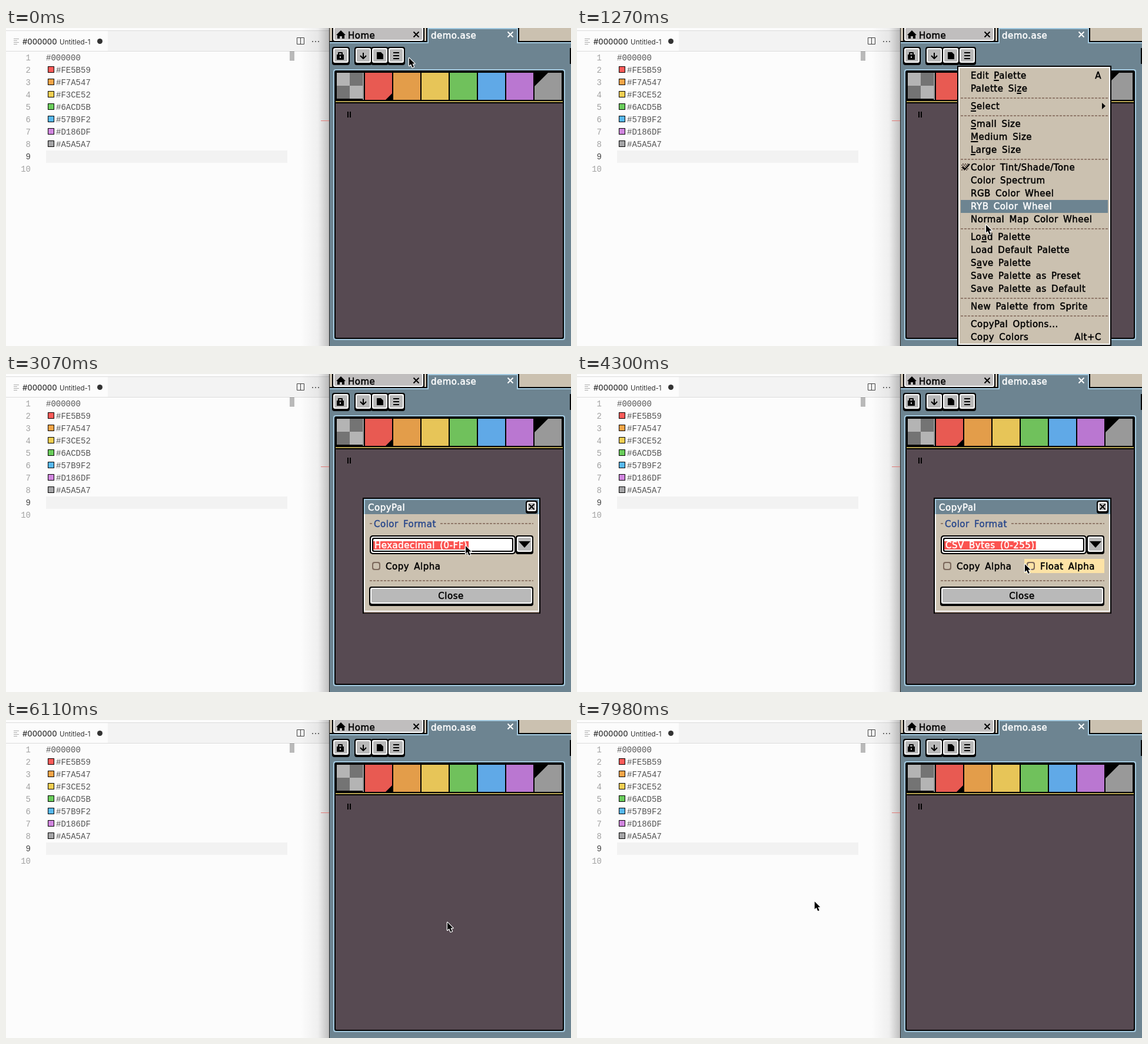
Recreate the animation shown at these times as an HTML page with a canvas. Size 960 by 540 pixels, loop 8000 ms.

```html
<!DOCTYPE html>
<html lang="en">
<head>
<meta charset="utf-8">
<title>Copying a palette</title>
<style>
  html, body { margin: 0; width: 100%; height: 100%; overflow: hidden; background: #fcfcfc; }
  canvas { display: block; width: 960px; height: 540px; }
</style>
</head>
<body>
<canvas id="stage" width="960" height="540"></canvas>
<script>
const ctx = document.getElementById('stage').getContext('2d');
const LOOP = 8000;
const BLACK = '#000', WHITE = '#fff', GRAY = '#b9b9b9';
const SLATE = '#6d8491', TAN = '#cbc1b0', PLUM = '#574a52', SKY = '#a3c9df', BROWN = '#917a6b';

// Pointer stops: time, x, y
const stops = [
  [0, 685, 51], [250, 664, 50], [560, 664, 50], [1270, 695, 334], [1650, 715, 502],
  [1900, 715, 502], [3070, 781, 292], [3900, 775, 330], [4300, 761, 323], [5400, 752, 375],
  [5900, 752, 375], [6110, 750, 344], [6500, 664, 53], [6690, 664, 53], [6900, 712, 485],
  [6980, 717, 491], [7380, 722, 524], [7560, 722, 524], [LOOP, 402, 307]
];

// "&" underlines the next letter, "|" precedes a shortcut.
const menuGroups = [
  ['Edit &Palette|A', 'Palette Si&ze'],
  ['&Select|▸'],
  ['&Small Size', '&Medium Size', '&Large Size'],
  ['Color Tint/Shade/Tone', 'Color Spectrum', 'RGB Color Wheel', 'RYB Color Wheel', 'Normal Map Color Wheel'],
  ['Lo&ad Palette', 'Load Default Palette', 'S&ave Palette', 'Save Palette as Preset', 'Save Palette as Default'],
  ['New Palette from Sprite'],
  ['CopyPal Options...', 'Copy Colors|Alt+C']
];

const codes = ['#000000', '#FE5B59', '#F7A547', '#F3CE52', '#6ACD5B', '#57B9F2', '#D186DF', '#A5A5A7'];
const swatches = ['#e85a52', '#e39d4a', '#e7c558', '#70c15c', '#60a9e7', '#ba77d1', '#999999'];

function rect(x, y, w, h, color) {
  ctx.fillStyle = color;
  ctx.fillRect(x, y, w, h);
}

// Nested boxes, each 2px inside the one before.
function box(x, y, w, h, radius, ...colors) {
  colors.forEach((color, i) => {
    ctx.fillStyle = color;
    ctx.beginPath();
    ctx.roundRect(x + 2 * i, y + 2 * i, w - 4 * i, h - 4 * i, Math.max(0, radius - i));
    ctx.fill();
  });
}

function button(x, y, w, h) {
  box(x, y, w, h, 4, BLACK);
  box(x + 2, y + 2, w - 4, h - 6, 3, WHITE, GRAY);
}

function shape(d, color, x = 0, y = 0) {
  ctx.save();
  ctx.translate(x, y);
  ctx.fillStyle = color;
  ctx.fill(new Path2D(d));
  ctx.restore();
}

function stroke(d, color, x = 0, y = 0, width = 2) {
  ctx.save();
  ctx.translate(x, y);
  ctx.strokeStyle = color;
  ctx.lineWidth = width;
  ctx.lineJoin = 'round';
  ctx.stroke(new Path2D(d));
  ctx.restore();
}

const cross = (x, y, color) => stroke('M-4.5-4.5L4.5 4.5M4.5-4.5L-4.5 4.5', color, x, y);

function dashes(x1, x2, y) {
  for (let x = x1; x < x2; x += 6) rect(x, y - 1, Math.min(4, x2 - x), 2, BROWN);
}

function text(str, x, baseline, font, color, align = 'left') {
  ctx.font = font;
  ctx.fillStyle = color;
  ctx.textAlign = align;
  ctx.fillText(str, x, baseline);
}

function label(str, x, middle, color = BLACK, align = 'left') {
  const mark = str.indexOf('&');
  const plain = str.replace('&', '');
  const baseline = middle + 6;
  ctx.letterSpacing = '0.5px';
  ctx.wordSpacing = '3px';
  text(plain, x, baseline, '15px "DejaVu Sans", sans-serif', color, align);
  ctx.strokeStyle = color;
  ctx.lineWidth = 0.5;
  ctx.strokeText(plain, x, baseline);
  if (mark >= 0) {
    const left = ctx.measureText(plain.slice(0, mark)).width;
    rect(x + left, baseline + 2, ctx.measureText(plain[mark]).width - 1, 2, color);
  }
  ctx.letterSpacing = ctx.wordSpacing = '0px';
}

// Smooth path through the stops that never overshoots one.
function pointerAt(t) {
  const next = Math.max(1, stops.findIndex(stop => stop[0] > t));
  const [p, q] = [stops[next - 1], stops[next]];
  const span = q[0] - p[0];
  const u = (t - p[0]) / span;
  const slope = (k, axis) => stops[k - 1] && stops[k]
    ? (stops[k][axis] - stops[k - 1][axis]) / (stops[k][0] - stops[k - 1][0]) : 0;
  const tangent = (k, axis) => {
    const a = slope(k, axis), b = slope(k + 1, axis);
    return a * b <= 0 ? 0 : 2 * a * b / (a + b);
  };
  return [1, 2].map(axis =>
    (1 + 2 * u) * (1 - u) ** 2 * p[axis] + u * (1 - u) ** 2 * span * tangent(next - 1, axis) +
    u * u * (3 - 2 * u) * q[axis] + u * u * (u - 1) * span * tangent(next, axis));
}

function drawEditor() {
  rect(0, 0, 550, 540, '#fcfcfc');
  rect(0, 4, 550, 36, '#dcdcdc');
  rect(0, 5, 550, 34, '#f3f3f3');
  rect(0, 5, 173, 34, '#fcfcfc');
  for (let i = 0; i < 4; i++) rect(13, 18 + i * 3, i % 2 ? 6 : 9, 1, '#aaa');
  text('#000000', 28, 27.5, '500 13px Inter, sans-serif', '#333');
  text('Untitled-1', 91, 27.5, '11.6px Inter, sans-serif', '#333');
  box(155, 18, 9, 9, 4.5, '#333');
  stroke('M.5.5h12v11h-12zM6.5.5v11', '#424242', 494, 16, 1);
  for (let i = 0; i < 3; i++) box(520 + i * 5, 22, 2, 2, 1, '#424242');

  rect(68, 208, 410, 21, '#f2f2f2');
  const mono = '14px "Liberation Mono", monospace';
  for (let n = 1; n <= 10; n++) {
    const y = 29 + n * 21;
    text(n, 42, y + 5, mono, n === 9 ? '#444' : '#a2a2a2', 'right');
    const code = codes[n - 1];
    if (!code) continue;
    text(code, n > 1 ? 85 : 68, y + 5, mono, '#555');
    if (n > 1) {
      rect(71, y - 6, 11, 11, BLACK);
      rect(72, y - 5, 9, 9, code);
    }
  }
  for (let y = 40; y < 56; y += 2) rect(482, y, 8, 1, '#777');

  const shade = ctx.createLinearGradient(500, 0, 550, 0);
  shade.addColorStop(0, 'rgba(0,0,0,0)');
  shade.addColorStop(0.6, 'rgba(0,0,0,.05)');
  shade.addColorStop(1, 'rgba(0,0,0,.25)');
  rect(500, 0, 50, 540, shade);
  rect(535, 157, 14, 1, '#e07a75');
}

function drawTabs() {
  rect(549, 0, 411, 540, SLATE);
  rect(549, 0, 411, 26, SKY);
  rect(549, 0, 411, 24, BLACK);
  rect(550, 0, 410, 22, TAN);
  box(554, -4, 157, 28, 4, BLACK, WHITE, '#c0bebe');
  rect(714, 0, 158, 24, BLACK);
  rect(716, 0, 154, 26, SKY);
  rect(718, 2, 150, 24, SLATE);
  shape('M8 0l8 8h-2v6h-4v-4h-4v4h-4v-6h-2z', BLACK, 561, 4);
  label('Home', 581, 12);
  cross(697, 11, BLACK);
  label('demo.ase', 722, 12, WHITE);
  cross(857, 11, WHITE);
  rect(549, 0, 1, 540, '#222');
  rect(958, 34, 2, 27, BLACK);
}

function drawToolbar() {
  button(554, 32, 30, 31);
  for (let i = 0; i < 3; i++) button(592 + i * 28, 32, 30, 31);
  rect(562, 45, 12, 9, BLACK);
  stroke('M0 5V0h6v5', BLACK, 565, 42);
  rect(567, 48, 2, 3, GRAY);
  stroke('M0 0v10l-5-5m5 5l5-5', BLACK, 607, 42);
  shape('M0 0h7l4 4v8h-11z', BLACK, 630, 41);
  for (let i = 0; i < 3; i++) rect(658, 41 + i * 5, 10, 2, BLACK);
}

function drawPalette() {
  box(556, 70, 394, 460, 4, SKY, BLACK, PLUM);
  rect(560, 72, 386, 56, BLACK);
  for (let i = 0; i < 4; i++) {
    const col = i % 2, row = i >> 1;
    rect(562 + col * 22, 76 + row * 22, 22, 22, col === row ? '#b4b4b4' : '#747474');
  }
  rect(606, 76, 2, 46, '#999');
  swatches.forEach((color, i) => rect(610 + i * 48, 76, 46, 46, color));
  shape('M0 0v-11l-11 11z', BLACK, 656, 122);
  shape('M0 0h23l-23 23z', BLACK, 898, 76);
  rect(560, 124, 386, 2, '#b5a252');
  rect(580, 142, 2, 10, BLACK);
  rect(584, 142, 2, 10, BLACK);
}

function drawMenu([hoverX, hoverY]) {
  box(646, 64, 262, 476, 0, BLACK, WHITE, TAN);
  let y = 80;
  menuGroups.forEach((group, g) => {
    if (g) {
      dashes(652, 902, y - 13);
      y -= -8 + 8;
    }
    for (const item of group) {
      const [name, shortcut] = item.split('|');
      const hot = hoverX > 652 && hoverX < 902 && hoverY >= y - 10 && hoverY < y + 12;
      const color = hot ? WHITE : BLACK;
      if (hot) rect(652, y - 10, 250, 22, SLATE);
      label(name, 669, y, color);
      if (shortcut === '▸') shape('M0 0l6 5.5l-6 5.5z', color, 892, y - 5);
      else if (shortcut) label(shortcut, 891, y, color, 'right');
      y += 22;
    }
    y += 8;
  });
  for (let i = 0; i < 36; i++) {
    const col = i % 6, row = Math.floor(i / 6);
    rect(653 + col * 2, 230 + row * 2, 2, 2, (col + row) % 2 ? '#65564d' : TAN);
  }
  stroke('M0 5l4 4l8-9', BLACK, 655, 231);
}

function drawCheckbox(left, name, pointer) {
  const hot = pointer[0] >= left && pointer[0] < left + 136 && Math.abs(pointer[1] - 326) < 12;
  if (hot) rect(left, 314, 136, 24, '#fde3a6');
  box(left + 4, 319, 14, 14, 4, '#7d6a5d', hot ? '#fde3a6' : TAN);
  label(name, left + 27, 326);
}

function drawDialog(format, pointer) {
  box(606, 210, 302, 197, 0, BLACK, SKY, SLATE);
  rect(608, 238, 298, 166, WHITE);
  rect(610, 238, 294, 164, TAN);
  rect(608, 404, 298, 2, '#7d6a60');
  label('CopyPal', 615, 226, WHITE);
  button(883, 215, 20, 22);
  cross(893, 225.5, BLACK);

  dashes(618, 624, 254);
  label('Color Format', 625, 254, '#2c4a8c');
  dashes(738, 896, 254);

  box(618, 274, 248, 32, 5, BLACK, WHITE, BLACK, WHITE);
  ctx.letterSpacing = '0.5px';
  ctx.wordSpacing = '3px';
  rect(624, 284, ctx.measureText(format).width + 4, 14, '#fb5350');
  label(format, 626, 290, WHITE);
  button(866, 274, 30, 32);
  shape('M0 0h20l-10 11z', BLACK, 871, 284);

  drawCheckbox(618, 'Copy Alpha', pointer);
  if (format.startsWith('CSV')) drawCheckbox(760, 'Float Alpha', pointer);
  dashes(618, 896, 351);
  button(617, 361, 279, 33);
  label('Close', 756, 376, BLACK, 'center');
}

function drawPointer([x, y]) {
  const arrow = 'M0 0V13L3 10.3L5.5 16L8 15L5.5 9.5H9.5Z';
  stroke(arrow, WHITE, x, y, 2.4);
  shape(arrow, BLACK, x, y);
}

function frame(now) {
  const t = Math.max(0, now) % LOOP;
  const pointer = pointerAt(t);
  const within = (from, to) => t >= from && t < to;
  drawEditor();
  drawTabs();
  drawToolbar();
  drawPalette();
  // The highlight trails the pointer slightly.
  if (within(420, 1860) || within(6690, 7540)) drawMenu(pointerAt(t - 80));
  if (within(1900, 5930)) drawDialog(t < 4100 ? 'Hexadecimal (0-FF)' : 'CSV Bytes (0-255)', pointer);
  drawPointer(pointer);
  requestAnimationFrame(frame);
}
requestAnimationFrame(frame);
</script>
</body>
</html>
```
